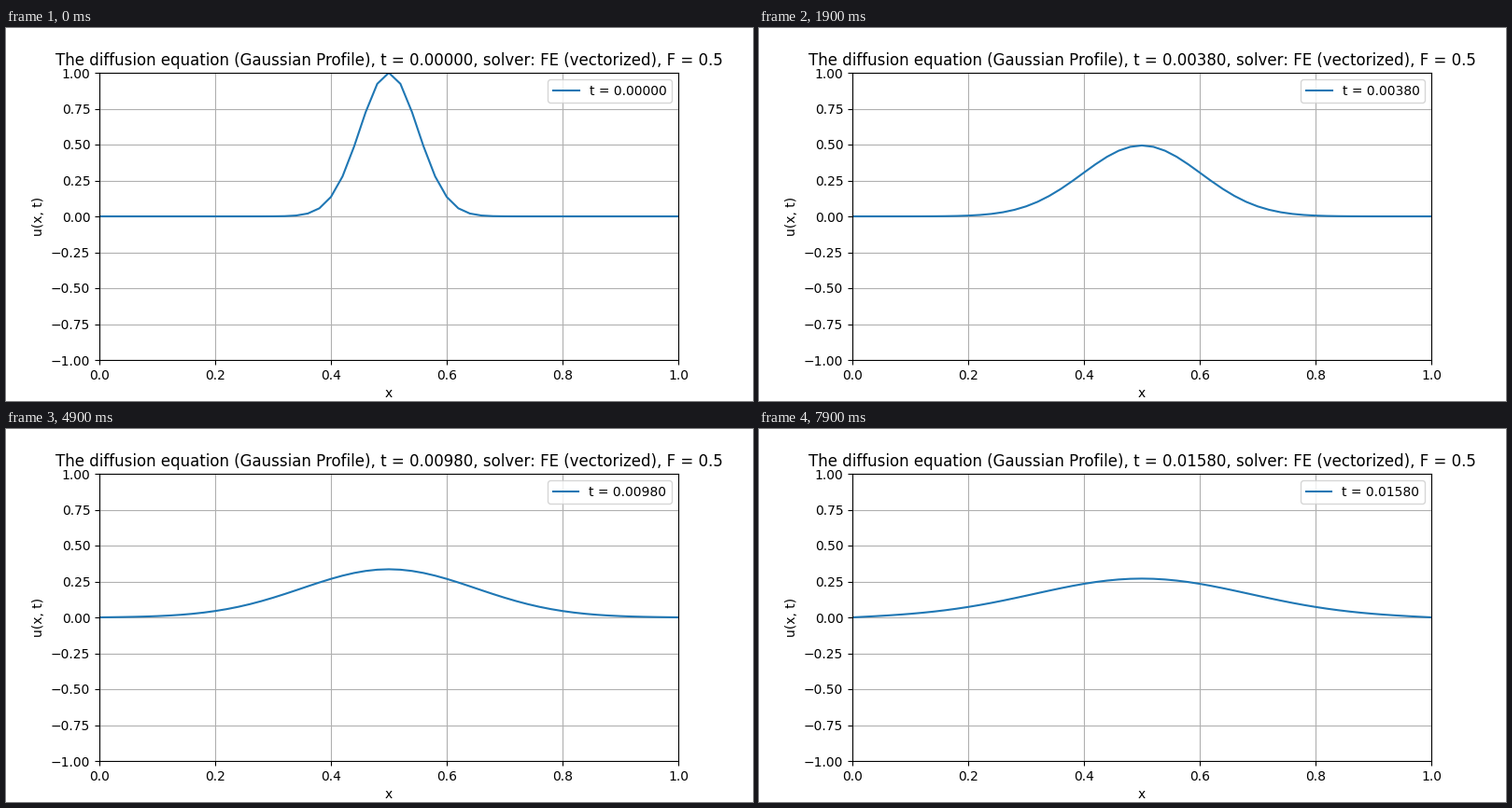
Recreate the animation shown at these times as a matplotlib script. Size 800 px wide and 400 px high, loop 8 s.

```python
import numpy as np
import matplotlib.pyplot as plt
from matplotlib.animation import FuncAnimation

FRAMES, INTERVAL = 80, 100
NX, F, SIGMA = 50, 0.5, 0.05
DX = 1 / NX
DT = F * DX**2


def solve(x, steps):
    """Forward Euler for u_t = u_xx with u = 0 at both ends."""
    u = np.exp(-0.5 * ((x - 0.5) / SIGMA) ** 2)
    history = [u]
    for _ in range(steps - 1):
        nxt = np.zeros_like(u)
        nxt[1:-1] = u[1:-1] + F * (u[:-2] - 2 * u[1:-1] + u[2:])
        u = nxt
        history.append(u)
    return history


x = np.linspace(0, 1, NX + 1)
profiles = solve(x, FRAMES)

fig, ax = plt.subplots(figsize=(8, 4), dpi=100)
line, = ax.plot(x, profiles[0], label="t = 0.00000")
ax.set(xlim=(0, 1), ylim=(-1, 1), xlabel="x", ylabel="u(x, t)")
ax.grid(True)
title = ax.set_title("")
label = ax.legend(loc="upper right").get_texts()[0]


def update(i):
    clock = f"t = {i * DT:.5f}"
    line.set_ydata(profiles[i])
    label.set_text(clock)
    title.set_text(f"The diffusion equation (Gaussian Profile), {clock}, "
                   f"solver: FE (vectorized), F = {F}")
    return line, label, title


anim = FuncAnimation(fig, update, frames=FRAMES, interval=INTERVAL,
                     repeat=True, repeat_delay=0)
plt.show()
```
